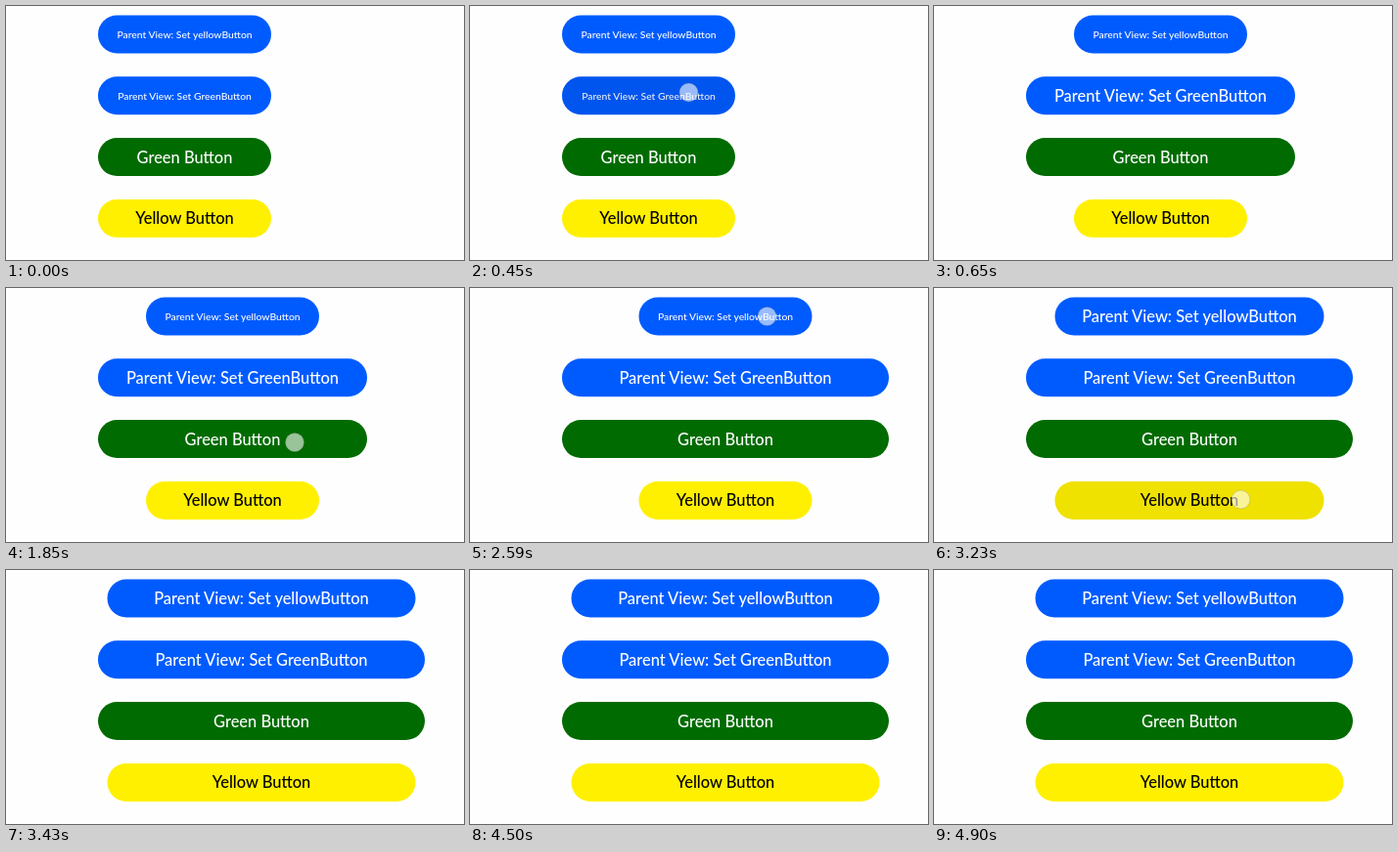
These frames come from a looping animation (468 by 260 pixels, 7400 ms). An HTML page:

```html
<!DOCTYPE html>
<html lang="en">
<head>
<meta charset="utf-8">
<style>
  html, body { margin: 0; width: 100%; height: 100%; overflow: hidden; background: #fefefe; }
  svg { display: block; }
  text { font-family: Lato, "Open Sans", sans-serif; font-weight: 500; text-anchor: middle; }
</style>
</head>
<body>
<svg id="stage" width="468" height="260" viewBox="0 0 468 260"></svg>
<script>
const LOOP = 7400, LEFT = 94, HEIGHT = 39, FRAME = 40;
const stage = document.getElementById('stage');

function add(tag, attrs) {
  const node = document.createElementNS('http://www.w3.org/2000/svg', tag);
  set(node, attrs);
  stage.append(node);
  return node;
}

function set(node, attrs) {
  for (const name in attrs) node.setAttribute(name, attrs[name]);
}

const buttons = [
  { label: 'Parent View: Set yellowButton', color: '#005bff', ink: '#fff', column: 'yellow', fits: true },
  { label: 'Parent View: Set GreenButton', color: '#005bff', ink: '#fff', column: 'green', fits: true },
  { label: 'Green Button', color: '#006b00', ink: '#fff', column: 'green' },
  { label: 'Yellow Button', color: '#fff000', ink: '#000', column: 'yellow' }
].map((button, row) => {
  const y = 9.5 + row * 62.8;
  const box = { y, height: HEIGHT, rx: HEIGHT / 2 };
  button.middle = y + HEIGHT / 2;
  button.pill = add('rect', { ...box, fill: button.color });
  button.text = add('text', { fill: button.ink });
  button.text.textContent = button.label;
  button.shade = add('rect', { ...box, fill: '#000' });
  return button;
});

const dot = add('circle', { r: 9.5, fill: '#fff', 'fill-opacity': .6, stroke: '#777', 'stroke-opacity': .35, 'stroke-width': .8 });

// Each tap resizes one column when the finger lifts, halfway through.
const taps = [
  { start: 410, length: 240, row: 1, x: 223.5, y: 88.5, column: 'green', width: 275 },
  { start: 1850, length: 160, row: 2, x: 295, y: 158, column: 'green', width: 334 },
  { start: 2590, length: 240, row: 0, x: 303.5, y: 29, column: 'yellow', width: 275 },
  { start: 3190, length: 240, row: 3, x: 313.5, y: 216.5, column: 'yellow', width: 315 }
];

const clamp = v => Math.max(0, Math.min(1, v));

function draw(time) {
  const widths = { green: 177, yellow: 177 };
  const shades = [0, 0, 0, 0];
  let touch = null;

  for (const tap of taps) {
    const age = time - tap.start, lift = tap.length / 2;
    if (age < 0) continue;
    if (age >= lift) widths[tap.column] = tap.width;
    else touch = tap;
    shades[tap.row] = .1 * Math.min(clamp(age / (1.6 * FRAME)), clamp((tap.length - age) / lift));
  }

  const center = LEFT + widths.green / 2;
  buttons.forEach((button, row) => {
    const width = widths[button.column];
    const small = button.fits && width < 200;
    const size = small ? 10.35 : 16.45;
    const span = { x: center - width / 2, width };
    set(button.pill, span);
    set(button.shade, { ...span, opacity: shades[row] });
    set(button.text, { x: center, y: button.middle + size * .36, 'font-size': size });
  });

  dot.style.display = touch ? '' : 'none';
  if (touch) set(dot, { cx: touch.x, cy: touch.y });
}

const began = performance.now();
function tick() {
  draw((performance.now() - began) % LOOP);
  requestAnimationFrame(tick);
}
tick();
</script>
</body>
</html>
```
